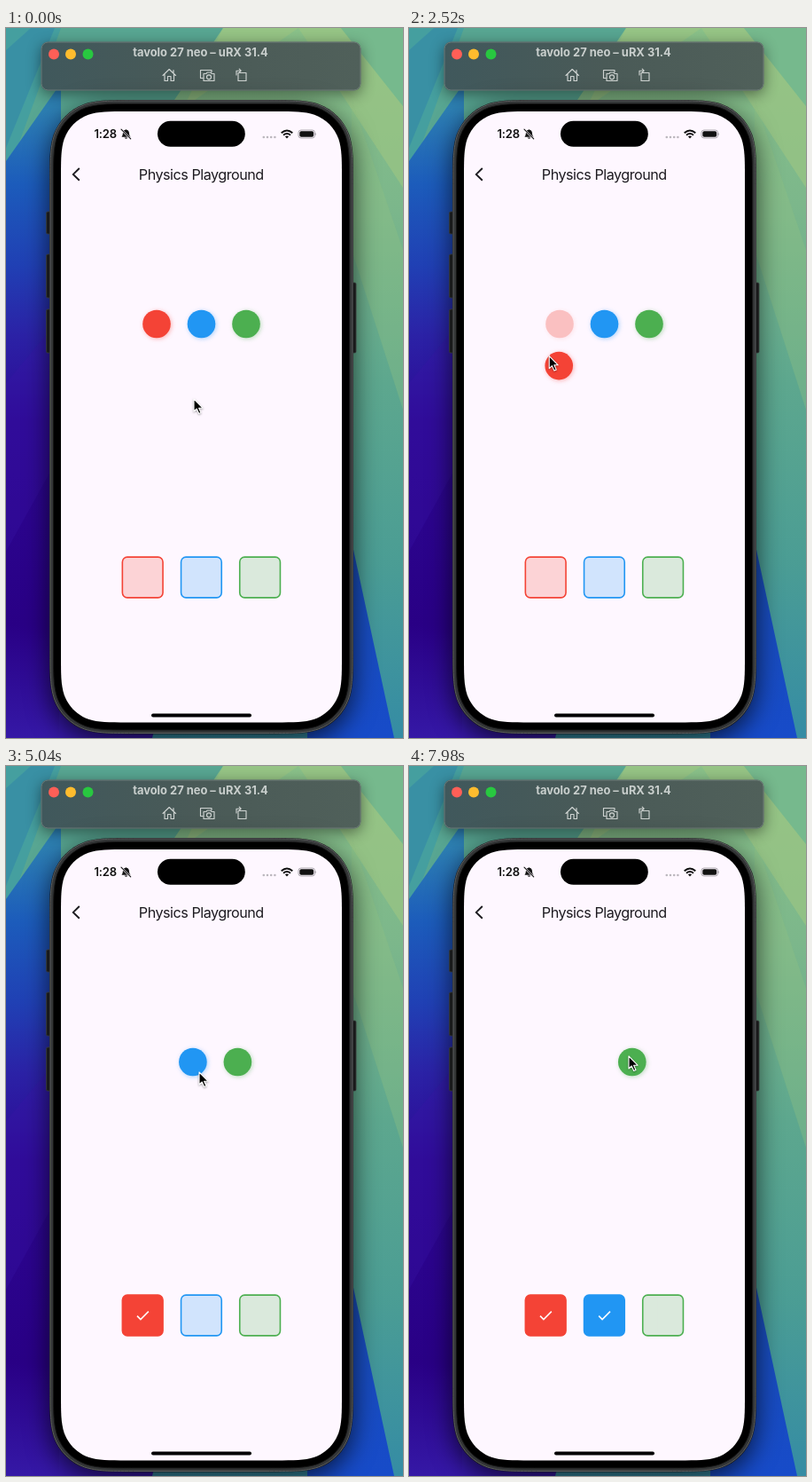
An HTML page that plays this animation: 448 px wide and 800 px high, repeating every 8000 ms.

```html
<!DOCTYPE html>
<html lang="en">
<head>
<meta charset="utf-8">
<title>Physics Playground</title>
<style>
  html, body { margin: 0; width: 100%; height: 100%; overflow: hidden; background: #1d3f9c; }
  svg { display: block; width: 100%; height: 100%; }
  text { font-family: Inter, Roboto, sans-serif; }
  .line { fill: none; stroke: #ced3d1; stroke-width: 1.15; stroke-linejoin: round; stroke-linecap: round; }
  .panel { filter: drop-shadow(0 4px 8px #0007); }
  .shadow { filter: drop-shadow(0 8px 14px #000a); }
  .ball { filter: drop-shadow(1.8px 1.8px 2.8px color-mix(in srgb, currentColor 38%, transparent)); }
</style>
</head>
<body>
<svg viewBox="0 0 448 800" preserveAspectRatio="none">
  <defs>
    <linearGradient id="left" gradientUnits="userSpaceOnUse" x1="0" y1="90" x2="0" y2="800">
      <stop offset="0" stop-color="#2d7fb2"/>
      <stop offset=".12" stop-color="#1c5cbb"/>
      <stop offset=".25" stop-color="#2040b4"/>
      <stop offset=".36" stop-color="#2b22a6"/>
      <stop offset=".5" stop-color="#2d0894"/>
      <stop offset=".82" stop-color="#290085"/>
      <stop offset="1" stop-color="#3518a6"/>
    </linearGradient>
    <linearGradient id="right" x1="0" y1="0" x2="0" y2="1">
      <stop offset="0" stop-color="#8ac189"/>
      <stop offset=".25" stop-color="#7cb78b"/>
      <stop offset=".5" stop-color="#5da78e"/>
      <stop offset=".75" stop-color="#4b9d94"/>
      <stop offset="1" stop-color="#358ca4"/>
    </linearGradient>
    <linearGradient id="corner" x1="0" y1="0" x2="0" y2="1">
      <stop offset="0" stop-color="#1a4db4"/>
      <stop offset="1" stop-color="#174bc9"/>
    </linearGradient>
    <linearGradient id="bar" x1="0" y1="0" x2="1" y2="0">
      <stop offset="0" stop-color="#40585c"/>
      <stop offset=".5" stop-color="#4a5a57"/>
      <stop offset="1" stop-color="#50605a"/>
    </linearGradient>
  </defs>

  <!-- wallpaper -->
  <rect width="448" height="800" fill="url(#right)"/>
  <path d="M0 0H245L150 140H0Z" fill="#58a692"/>
  <path d="M245 0H378L448 88V180L330 0L200 90Z" fill="#9ec783" opacity=".6"/>
  <path d="M378 0H448V88Z" fill="#76b98d"/>
  <path d="M390 80L448 250V430L390 250Z" fill="#91bf82" opacity=".35"/>
  <path d="M0 0H62L0 170Z" fill="#459f9f"/>
  <path d="M0 150L62 62V800H0Z" fill="url(#left)"/>
  <path d="M0 25L28 0H55L0 135Z" fill="#3288a9" opacity=".6"/>
  <path d="M0 400L50 340V500L0 590Z" fill="#3a16a5" opacity=".3"/>
  <path d="M60 740H180L165 800H60Z" fill="#3518a6"/>
  <path d="M340 560H386L438 800H340Z" fill="url(#corner)"/>

  <!-- device toolbar -->
  <rect class="panel" x="39.5" y="15.5" width="361" height="55" rx="8" fill="url(#bar)"/>
  <rect x="40" y="16" width="360" height="54" rx="7.5" fill="none" stroke="#7e8d88" stroke-opacity=".65"/>
  <circle cx="54" cy="29.5" r="6" fill="#ff5f57"/>
  <circle cx="73" cy="29.5" r="6" fill="#febc2e"/>
  <circle cx="92.5" cy="29.5" r="6" fill="#28c840"/>
  <text x="219.5" y="32" text-anchor="middle" font-size="12.9" font-weight="700" fill="#c9cfcd">tavolo 27 neo – uRX 31.4</text>
  <g class="line">
    <path d="M177 53.5L184.2 46.5L191.5 53.5M179 52V59.5H182.5V54.5H186V59.5H189.5V52M189 50.5V47.5"/>
    <path d="M222 56.5H219.5V47.5H232V49.5M223 51.5H226L227 50H231L232 51.5H235V59.5H223Z"/>
    <circle cx="229" cy="55.3" r="2.5"/>
    <path d="M262 50.5H271V59.5H262ZM260 53V48.2H265M263.2 46.2L265.2 48.2L263.2 50.2"/>
  </g>

  <!-- phone -->
  <g fill="#252627" stroke="#505354" stroke-width=".8">
    <rect x="45.5" y="207" width="6" height="25" rx="1.5"/>
    <rect x="45.5" y="255" width="6" height="49" rx="1.5"/>
    <rect x="45.5" y="317" width="6" height="49" rx="1.5"/>
    <rect x="388" y="287" width="7" height="79" rx="1.5"/>
  </g>
  <g id="phone"></g>

  <!-- status bar -->
  <text x="99.5" y="124.2" font-size="13" font-weight="600" letter-spacing="-.2" fill="#111">1:28</text>
  <path d="M130.5 122.7C132 121 131.7 119 132 117.8C132.4 115.8 133.6 115 134.7 114.8C135 113.9 136 113.9 136.3 114.8C138.2 115.2 138.9 117 139 118.5C139.1 120.5 139.5 121.6 140.5 122.7ZM133.5 123.6H137.5Q135.5 126 133.5 123.6Z" fill="#111"/>
  <path d="M130.2 114.5L140.7 125" stroke="#fef7ff" stroke-width="2.2"/>
  <path d="M130 114.2L140.7 124.8" stroke="#111" stroke-width="1.1" stroke-linecap="round"/>
  <rect x="171" y="104.8" width="98.8" height="29" rx="14.5"/>
  <path d="M290.8 123H304" stroke="#bcb7be" stroke-width="2.6" stroke-linecap="round" stroke-dasharray="0 4.2"/>
  <g fill="none" stroke="#111" stroke-width="1.9">
    <path d="M310.7 118.2Q317 112.6 323.3 118.2"/>
    <path d="M313 120.7Q317 117.2 321 120.7"/>
  </g>
  <path d="M314.9 122.3Q317 120.7 319.1 122.3L317 124.5Z" fill="#111"/>
  <rect x="330" y="115" width="18.5" height="9" rx="2.9" fill="none" stroke="#99949b" stroke-width=".8"/>
  <rect x="331.3" y="116.3" width="15.9" height="6.4" rx="1.8" fill="#111"/>
  <path d="M349.4 118V121.2Q351 119.6 349.4 118Z" fill="#99949b"/>

  <!-- app bar -->
  <path d="M82.8 158L75.8 164.9L82.8 171.8" fill="none" stroke="#1d1b20" stroke-width="1.9"/>
  <text x="220.3" y="171.2" text-anchor="middle" font-size="16.2" letter-spacing="-.5" fill="#1d1b20">Physics Playground</text>
  <rect x="164" y="772.4" width="113" height="4" rx="2" fill="#000"/>

  <g id="boxes"></g>
  <g id="balls"></g>
  <path id="cursor" d="M0 0V14L3.2 11L5.7 16.5L8 15.5L5.6 10.2H10Z" stroke="#fff" stroke-width="1.1" stroke-linejoin="round" style="filter:drop-shadow(0 1px 1px #0005)"/>
</svg>
<script>
const LOOP = 8000, STEP = 70;
const COLORS = ['#f44336', '#2196f3', '#4caf50'];
const ROW_Y = 333.5, BOX_Y = 619, BOX_SIZE = 47.3;
const BOX_X = [154.2, 220.4, 286.6];

// Each key is [ms, x, y].
const cursorPath = [
  [770, 212, 418], [1820, 183, 351], [1960, 182, 350], [2240, 159, 322.5],
  [2380, 159, 322.5], [2940, 154, 624], [3010, 154, 626], [3500, 154, 626],
  [4340, 218, 345], [5040, 218, 345], [5250, 206, 326.5], [5390, 206, 326.5],
  [5950, 300, 611], [6090, 300, 613], [6400, 300, 613], [6860, 216, 597],
  [7140, 218, 612], [7420, 218, 612], [7910, 248, 327]
];
const drags = [
  { grab: 2380, drop: 3290, offset: [[0, 11, 11]] },
  { grab: 5390, drop: 7280, offset: [[6400, 4.5, 7], [6860, -2, 5]] },
  { grab: Infinity, drop: Infinity }
];

function pointAt(keys, t) {
  const next = keys.findIndex(key => key[0] > t);
  if (next === 0) return keys[0].slice(1);
  if (next < 0) return keys[keys.length - 1].slice(1);
  const [t0, x0, y0] = keys[next - 1], [t1, x1, y1] = keys[next];
  const p = (t - t0) / (t1 - t0), e = p * p * (3 - 2 * p);
  return [x0 + (x1 - x0) * e, y0 + (y1 - y0) * e];
}

function add(parent, tag, attrs) {
  const node = document.createElementNS('http://www.w3.org/2000/svg', tag);
  for (const name in attrs) node.setAttribute(name, attrs[name]);
  return parent.appendChild(node);
}

const place = (node, x, y) => node.setAttribute('transform', `translate(${x} ${y})`);
const show = (node, visible) => node.setAttribute('visibility', visible ? 'visible' : 'hidden');

// Rectangle whose corners ease into the straight sides.
function smoothRect(x, y, w, h, r) {
  const half = [[0, 1.529], [0, 1.088], [0, .868], [.075, .631], [.169, .373]];
  const corner = [...half, ...half.map(([a, b]) => [b, a]).reverse()];
  const side = (flipX, flipY) => {
    const points = corner.map(([a, b]) =>
      [flipX ? x + w - a * r : x + a * r, flipY ? y + h - b * r : y + b * r]);
    if (flipX !== flipY) points.reverse();
    return `${points[0]}C${points.slice(1)}`;
  };
  return `M${side(false, false)}L${side(true, false)}L${side(true, true)}L${side(false, true)}Z`;
}

const phone = document.getElementById('phone');
const shell = (inset, fill, stroke = 'none', className = '') => add(phone, 'path', {
  d: smoothRect(49 + inset, 81 + inset, 343 - 2 * inset, 714.5 - 2 * inset, 62 - inset),
  fill, stroke, class: className
});
shell(0, '#1b1c1d', 'none', 'shadow');
shell(1, '#333536', '#5b5d5e');
shell(4.5, '#000', '#151515');
shell(13, '#fef7ff');

const boxLayer = document.getElementById('boxes');
const ballLayer = document.getElementById('balls');
const cursor = document.getElementById('cursor');

const boxes = COLORS.map((color, i) => {
  const x = BOX_X[i], inset = BOX_SIZE / 2 - .8;
  const rect = add(boxLayer, 'rect', {
    x: x - inset, y: BOX_Y - inset, width: inset * 2, height: inset * 2, rx: 5.5,
    fill: color, stroke: color, 'stroke-width': 1.6
  });
  const check = add(boxLayer, 'path', {
    d: `M${x - 6.2} ${BOX_Y + .6}l3.9 3.9l8.9 -8.9`, fill: 'none', stroke: '#fff', 'stroke-width': 1.6
  });
  return { rect, check };
});

const makeBall = color => add(ballLayer, 'circle', { class: 'ball', r: 15.8, fill: color, color });
const resting = COLORS.map(makeBall);
const dragged = COLORS.map(makeBall);

function draw(t) {
  const [cx, cy] = pointAt(cursorPath, t);
  place(cursor, cx, cy);
  let shift = 0;
  drags.forEach(({ grab, drop, offset }, i) => {
    const done = t >= drop, held = t >= grab && !done;
    const hover = held && Math.abs(cx - BOX_X[i]) < BOX_SIZE / 2 && Math.abs(cy - BOX_Y) < BOX_SIZE / 2;
    boxes[i].rect.setAttribute('fill-opacity', done ? 1 : hover ? .32 : .2);
    show(boxes[i].check, done);

    place(resting[i], 170 + 50.5 * i - shift, ROW_Y);
    resting[i].setAttribute('opacity', held ? .3 : 1);
    show(resting[i], !done);
    show(dragged[i], held);
    if (held) {
      const [dx, dy] = pointAt(offset, t);
      place(dragged[i], cx + dx, cy + dy);
    }
    if (done) shift += 9.6;
  });
}

const start = performance.now();
function tick() {
  const t = (performance.now() - start) % LOOP;
  draw(Math.floor(t / STEP) * STEP);
  requestAnimationFrame(tick);
}
tick();
</script>
</body>
</html>
```
